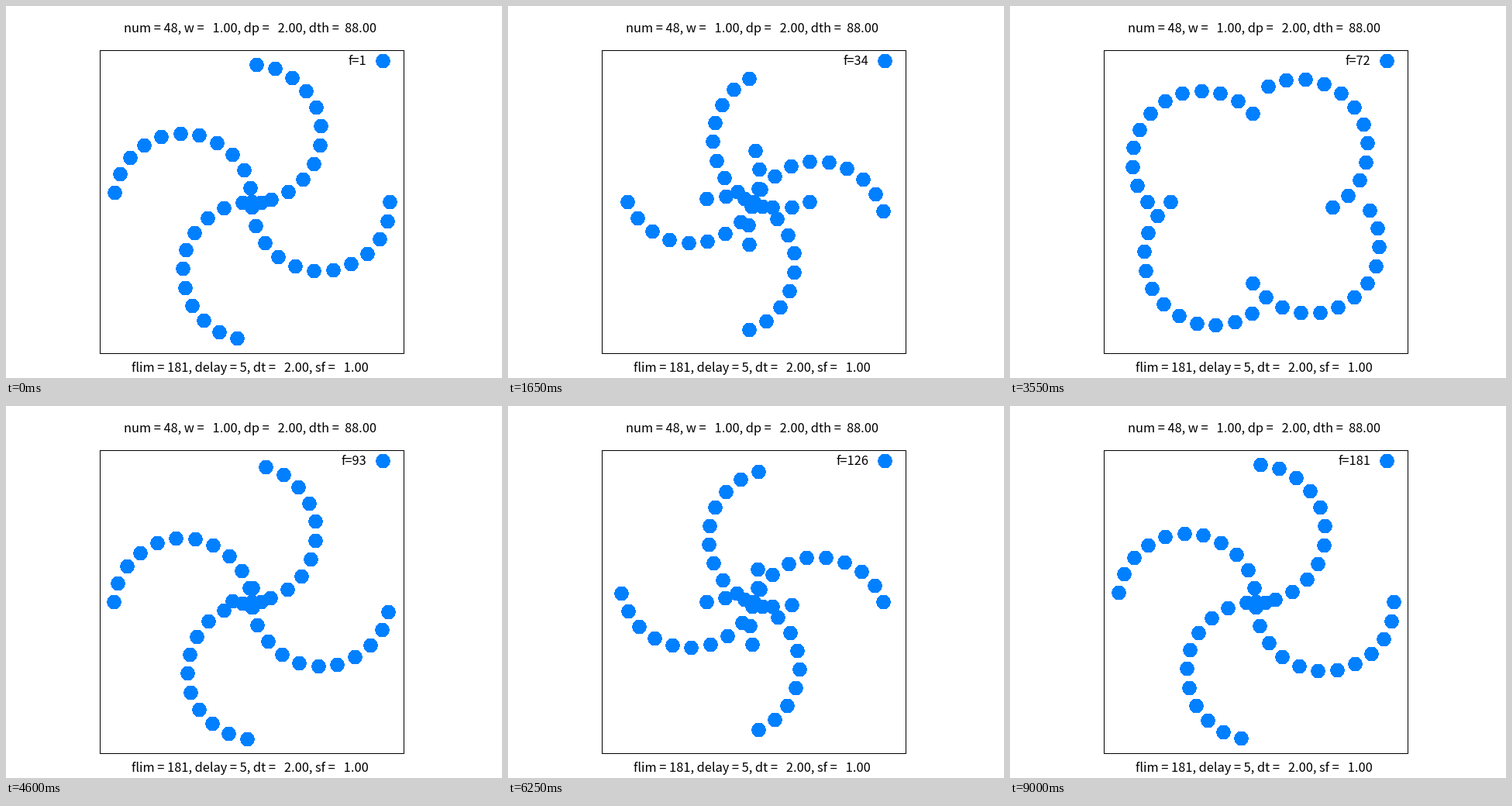
Recreate the animation shown at these times as a matplotlib script. Size 640 px wide and 480 px high, loop 9050 ms.

```python
import numpy as np
import matplotlib.pyplot as plt
from matplotlib.animation import FuncAnimation
from matplotlib.collections import EllipseCollection
from matplotlib.patches import Rectangle

W, H, DPI = 640, 480, 100
PX = 72 / DPI                    # points per pixel
FRAMES, DELAY = 181, 50
NUM, FREQ, DPHASE, DTHETA, DT = 48, 1.0, 2.0, 88.0, 2.0
LEFT, RIGHT, TOP, BOTTOM = 121, 513, 57, 448
SPAN = 2.2                       # both axes run from -1.1 to 1.1
BLUE = "#0080ff"

plt.rcParams["font.family"] = "Noto Sans CJK JP"

fig = plt.figure(figsize=(W / DPI, H / DPI), dpi=DPI, facecolor="white")
ax = fig.add_axes([0, 0, 1, 1])
ax.set_xlim(0, W)
ax.set_ylim(H, 0)
ax.axis("off")


def label(x, y, text, ha="left"):
    return ax.text(x, y, text, ha=ha, va="baseline", fontsize=16.4 * PX,
                   color="black")


def dots(points):
    n = len(points)
    group = EllipseCollection([17.4] * n, [17.8] * n, [0] * n, units="xy",
                              offsets=points, offset_transform=ax.transData,
                              facecolors=BLUE, linewidths=0,
                              antialiaseds=False)
    ax.add_collection(group, autolim=False)
    return group


def positions(frame):
    """Dots swinging along lines turned by DTHETA each, on whole pixels."""
    i = np.arange(NUM)
    r = np.cos(np.radians(FREQ * DT * frame + DPHASE * i))
    th = np.radians(DTHETA * i)
    x = (LEFT + RIGHT) / 2 + r * np.cos(th) * (RIGHT - LEFT) / SPAN
    y = (TOP + BOTTOM - 1) / 2 - r * np.sin(th) * (BOTTOM - TOP) / SPAN
    return np.column_stack([np.floor(x + 0.5) + 0.5, np.ceil(y - 1e-6) + 1])


ax.add_patch(Rectangle((LEFT, TOP), RIGHT - LEFT, BOTTOM - TOP,
                       fill=False, ec="black", lw=PX, antialiased=False))
label(152, 34, f"num = {NUM}, w = {FREQ:6.2f}, dp = {DPHASE:6.2f}, "
               f"dth = {DTHETA:6.2f}")
label(161.5, 472, f"flim = {FRAMES}, delay = {DELAY // 10}, dt = {DT:6.2f}, "
                  f"sf = {1:6.2f}")
dots([(486.5, 71)])
swarm = dots(positions(0))
counter = label(465.5, 76, "f=1", "right")


def update(frame):
    swarm.set_offsets(positions(frame))
    counter.set_text(f"f={frame + 1}")
    return swarm, counter


anim = FuncAnimation(fig, update, frames=FRAMES, interval=DELAY,
                     repeat=True, repeat_delay=0)
plt.show()
```
